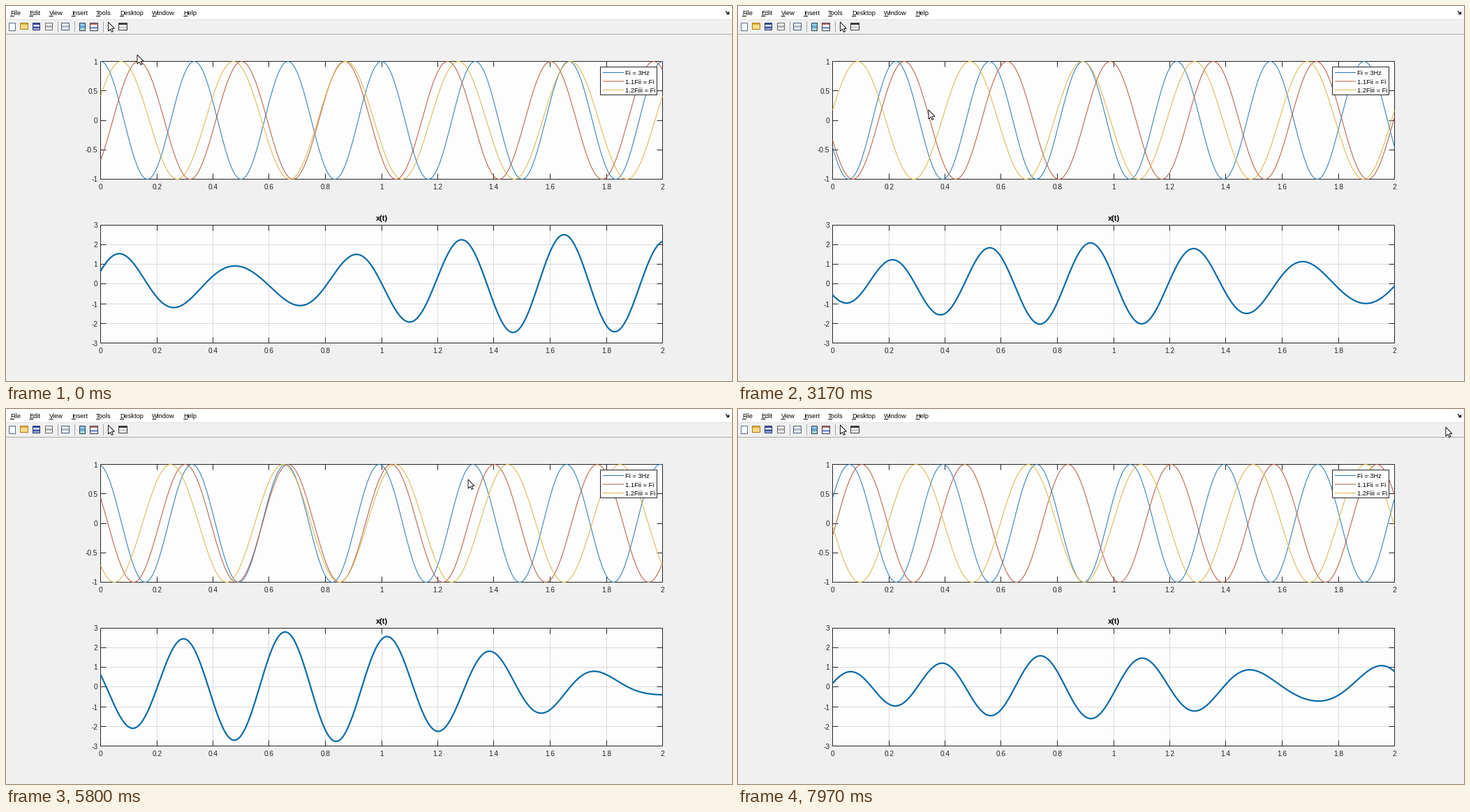
Recreate the animation shown at these times as a matplotlib script. Size 1040x538 px, loop 8 s.

```python
import numpy as np
import matplotlib.pyplot as plt
from matplotlib.animation import FuncAnimation
from matplotlib.patches import Polygon, Rectangle

plt.rcParams["path.snap"] = False  # half-pixel coordinates are already crisp

W, H, DPI = 1040, 538, 100
LOOP_MS, FRAMES = 8000, 200
PX = 72 / DPI  # points per pixel

INK, PANEL, PAPER, GRID = "#262626", "#f0f0f0", "#fdfdfd", "#dadadf"
BLUE, RED, GOLD = "#2878ae", "#b4583f", "#dab548"
LEFT, RIGHT = 135.5, 940.5

# Arbitrary phases, as the time of each cosine's first peak, per draw.
FREQS = 3 / np.array([1.0, 1.1, 1.2])
PEAKS = np.array([
    [0.270, 0.230, 0.130],
    [0.000, 0.135, 0.073],
    [0.225, 0.255, 0.089],
    [0.325, 0.301, 0.249],
    [0.060, 0.104, 0.297],
])
FIRST_SWITCH, PERIOD, STEP_MS = 640, 2775, 80

# Pointer stops: time (ms), x, y
STOPS = np.array([(0, 188, 70), (1770, 187, 68), (3170, 273, 149),
                  (4530, 366, 195), (5800, 662, 101), (6900, 662, 101),
                  (7970, 1014, 26)])
ARROW = np.array([(0, 0), (0, 13), (3, 10.2), (5, 14.4), (7, 13.5),
                  (5, 9.3), (9, 9.3)])

fig = plt.figure(figsize=(W / DPI, H / DPI), dpi=DPI, facecolor=PANEL)
ax = fig.add_axes([0, 0, 1, 1])
ax.set(xlim=(0, W), ylim=(H, 0))
ax.axis("off")


def rect(x0, y0, x1, y1, fill, edge="none", z=1):
    ax.add_patch(Rectangle((x0, y0), x1 - x0, y1 - y0, fc=fill, ec=edge,
                           lw=PX, zorder=z, joinstyle="miter"))


def arrow(x, y, z):
    patch = Polygon(ARROW + (x, y), closed=True, fc="white", ec="black",
                    lw=0.9 * PX, zorder=z)
    return ax.add_patch(patch)


def line(xs, ys, color=INK, lw=1.0, z=2):
    return ax.plot(xs, ys, color=color, lw=lw * PX, zorder=z,
                   solid_capstyle="butt")[0]


def label(x, y, text, px, ha="left", color="black", **kw):
    return ax.text(x, y, text, fontsize=px * PX, ha=ha, va="baseline",
                   color=color, family="Liberation Sans", zorder=6, **kw)


def draw_menu():
    rect(0, 0, W, 19, "white")
    line([0, W], [19.5, 19.5], "#e2e2e2")
    x = 6
    for name in "File Edit View Insert Tools Desktop Window Help".split():
        text = label(x, 13, name, 9.2)
        line([x, x + 6], [14.5, 14.5], "black")
        x = text.get_window_extent().x1 + 12.3
    line([1031, 1035.5], [7.5, 11.5], "black", 1.4)
    line([1032, 1035.5, 1035.5], [11.5, 11.5, 8], "black", 1.2)


def icon(x, width, height, edge, *bands):
    """Outlined box centred on the toolbar, filled with stacked bands."""
    x0, y0 = round(x - width / 2) + 0.5, round(29 - height / 2) + 0.5
    step = height / len(bands)
    for i, color in enumerate(bands):
        rect(x0, y0 + i * step, x0 + width, y0 + (i + 1) * step, color, z=2)
    rect(x0, y0, x0 + width, y0 + height, "none", edge, z=3)


def draw_toolbar():
    line([0, W], [40.5, 40.5], "#a9a9a4")
    groups = [
        [(9, 11, "#5a6f8c", "white"),
         (11, 9, "#a87a20", "#e0b040", "#f8dc7c", "#f8dc7c"),
         (10, 10, "#26346e", "#3c4fa8", "#e6ecfa", "#3c4fa8", "#a9b4d8")
         , (10, 10, "#666666", "white", "#b4b4b4", "white")],
        [(11, 10, "#44566e", "white", "#b4c0d0", "#f4f8ff")],
        [(8, 11, "#333c48", "#8cc8f0", "#58a8d8", "#a8dcd4"),
         (11, 11, "#333c48", "#c87068", "white", "#7c90d0", "white")],
        [None, (12, 10, "#333333", "#444444", "white", "#cccccc", "white")],
    ]
    x = 8.7
    for i, group in enumerate(groups):
        if i:
            separator = int(x - 3.8) + 0.5
            line([separator, separator], [22, 38], "#a8a8a8")
            x += 6.7
        for spec in group:
            if spec:
                icon(x, *spec)
            else:
                arrow(x - 3.5, 23, 3)
            x += 17.3


def draw_axes(top, bottom, ticks, grid):
    rect(LEFT, top, RIGHT, bottom, PAPER)
    rect(LEFT, top, RIGHT, bottom, "none", INK, z=3)
    for i, x in enumerate(np.round(np.linspace(LEFT, RIGHT, 11) - 0.5) + 0.5):
        if grid:
            line([x, x], [top, bottom], GRID)
        for y, d in ((top, 8), (bottom, -8)):
            line([x, x], [y, y + d], z=3)
        label(x, bottom + 14.5, f"{i / 5:g}", 10.1, "center", INK)
    rows = np.round(np.linspace(top, bottom, len(ticks)) - 0.5) + 0.5
    for y, value in zip(rows, ticks):
        if grid:
            line([LEFT, RIGHT], [y, y], GRID)
        for x, d in ((LEFT, 8), (RIGHT, -8)):
            line([x, x + d], [y, y], z=3)
        label(131.3, y + 4, f"{value:g}", 10.1, "right", INK)


def draw_legend():
    rect(851.5, 87.5, 932.5, 127.5, "white", INK, z=5)
    rows = (("Fi = 3Hz", BLUE), ("1.1Fii = Fi", RED), ("1.2Fiii = Fi", GOLD))
    for i, (text, color) in enumerate(rows):
        y = 95.5 + 12.5 * i
        line([855, 885], [y, y], color, z=6)
        label(887, y + 3.5, text, 9.3)


draw_menu()
draw_toolbar()
draw_axes(79.5, 248.5, np.linspace(1, -1, 5), grid=False)
draw_axes(314.5, 483.5, range(3, -4, -1), grid=True)
label(538, 308.5, "x(t)", 11, "center", weight="bold")
draw_legend()

t = np.linspace(0, 2, 601)
xs = LEFT + (RIGHT - LEFT) * t / 2
tones = [line(xs, 0 * xs, color, z=4) for color in (BLUE, RED, GOLD)]
total = line(xs, 0 * xs, "#0a6ba8", 2.2, 4)
pointer = arrow(0, 0, 10)


def waves(draw):
    return np.cos(2 * np.pi * FREQS[:, None] * (t - PEAKS[draw][:, None]))


def pointer_at(ms):
    i = np.searchsorted(STOPS[1:-1, 0], ms, "right")
    (t0, *start), (t1, *end) = STOPS[i], STOPS[i + 1]
    u = (ms - t0) / (t1 - t0)
    return np.array(start) + np.subtract(end, start) * u * u * (3 - 2 * u)


def update(frame):
    ms = frame * LOOP_MS / FRAMES
    draw, elapsed = divmod(ms + PERIOD - FIRST_SWITCH, PERIOD)
    old, new = waves(int(draw)), waves(int(draw) + 1)
    # the sum fades in twentieths to the new phases, then rests
    blend = min(0.05 * (elapsed // STEP_MS), 0.95)
    mix = (1 - blend) * old.sum(axis=0) + blend * new.sum(axis=0)
    for curve, wave in zip(tones, new):
        curve.set_ydata(164 - 84.5 * wave)
    total.set_ydata(399 - 84.5 / 3 * mix)
    pointer.set_xy(ARROW + pointer_at(ms))
    return (*tones, total, pointer)


anim = FuncAnimation(fig, update, frames=FRAMES, interval=LOOP_MS / FRAMES,
                     repeat=True, repeat_delay=0, blit=False)
plt.show()
```
